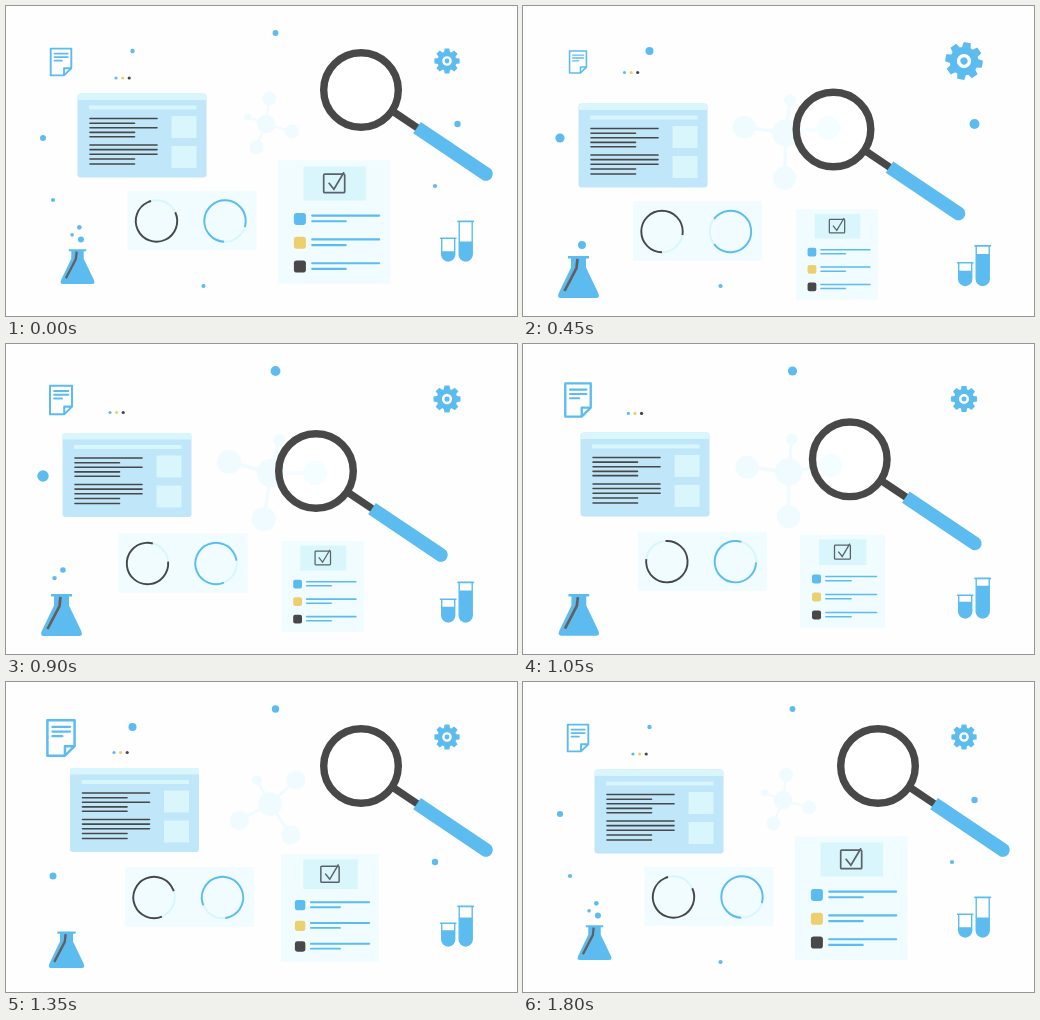
Recreate the animation shown at these times as an HTML page. Size 511 px wide and 310 px high, loop 1830 ms.

```html
<!DOCTYPE html>
<html lang="en">
<head>
<meta charset="utf-8">
<title>Research</title>
<style>
html, body { margin: 0; width: 100%; height: 100%; overflow: hidden; background: #fefefe; }
svg { display: block; width: 511px; height: 310px; }
</style>
</head>
<body>
<svg id="stage" viewBox="0 0 511 310" fill="none"></svg>
<script>
const BLUE = '#5dbcef', DARK = '#484848', YELLOW = '#ecd06f', PALE = '#f0fcff', ICE = '#d9f6fd';
const LOOP = 1830, STEP = 30, CYCLE = 1800;
const KEYS = [0, 210, 450, 900, 1170, 1350, 1800];
const stage = document.getElementById('stage');

function add(tag, attrs, parent = stage) {
  const node = document.createElementNS('http://www.w3.org/2000/svg', tag);
  set(node, attrs);
  return parent.appendChild(node);
}
function set(node, attrs) {
  for (const name in attrs) node.setAttribute(name, attrs[name]);
}
const group = parent => add('g', {}, parent);
const rect = (parent, x, y, width, height, fill, rx = 0) => add('rect', { x, y, width, height, fill, rx }, parent);
const path = (parent, d, attrs) => add('path', { d, ...attrs }, parent);
const disc = (parent, cx, cy, r, fill) => add('circle', { cx, cy, r, fill }, parent);
const line = (parent, x1, x2, y, stroke, width) =>
  path(parent, `M${x1} ${y}H${x2}`, { stroke, 'stroke-width': width, 'stroke-linecap': 'round' });
const place = (node, x, y, scale = 1, turn = 0) =>
  set(node, { transform: `translate(${x} ${y}) rotate(${turn}) scale(${scale})` });

// Periodic monotone cubic through the given values.
function track(values, times = KEYS) {
  const n = times.length - 1;
  const slope = i => (values[i + 1] - values[i]) / (times[i + 1] - times[i]);
  const tangent = i => {
    const a = slope((i + n - 1) % n), b = slope(i % n);
    return a * b > 0 ? 2 * a * b / (a + b) : 0;
  };
  return t => {
    let i = 0;
    while (i < n - 1 && t >= times[i + 1]) i++;
    const h = times[i + 1] - times[i], u = (t - times[i]) / h, v = 1 - u;
    return values[i] * (1 + 2 * u) * v * v + tangent(i) * h * u * v * v
      + values[i + 1] * (3 - 2 * u) * u * u - tangent(i + 1) * h * u * u * v;
  };
}

// Progress and opacity of something shown from start to end, across the seam if needed.
function span(t, start, end, fade = 90) {
  const wrap = ms => (ms + CYCLE) % CYCLE;
  const length = wrap(end - start), age = wrap(t - start);
  const opacity = Math.max(0, Math.min(1, age / fade, (length - age) / fade));
  return { p: age / length, opacity };
}

const updates = [];

function buildMolecule() {
  const g = group(), nodes = [[284, 34, 6], [0, 44, 12], [99, 46.5, 12], [195, 43.5, 12]];
  for (const [deg, dist, r] of nodes) {
    const a = deg * Math.PI / 180, x = dist * Math.cos(a), y = dist * Math.sin(a);
    path(g, `M0 0L${x} ${y}`, { stroke: '#effbfe', 'stroke-width': 3.5 });
    disc(g, x, y, r, '#effbfe');
  }
  const hub = disc(g, 0, 0, 13.5, '#effbfe');
  const x = track([260, 260, 263, 265, 266, 264, 260]), y = track([118, 123, 127, 129, 126, 122, 118]);
  const scale = track([.58, .79, .97, 1, .91, .8, .58]), turn = track([-83, -46, -7, 0, -21, -43, -83]);
  updates.push(t => {
    place(g, x(t), y(t), scale(t), turn(t));
    set(hub, { r: 11.5 + 2.6 / scale(t) });
  });
}

function buildWindow() {
  const g = group();
  rect(g, 71.5, 87.5, 129, 84, '#bfe6f9', 3);
  path(g, 'M71.5 94V90.5a3 3 0 0 1 3-3h123a3 3 0 0 1 3 3V94Z', { fill: ICE });
  rect(g, 83, 99.5, 107.5, 4, ICE);
  const rows = [[112.5, 1], [117.2, 0], [121.8, 1], [126.4, 0], [130.7, 0],
    [139, 1], [143.6, 1], [148.3, 1], [153, 0], [158, 0]];
  for (const [y, long] of rows) line(g, 84, long ? 151 : 128.5, y, DARK, 1.6);
  rect(g, 165.5, 110, 25, 22, ICE);
  rect(g, 165.5, 140, 25, 22, ICE);
  const x = track([0, -6.5, -16, -15, -12.5, -7.5, 0]), y = track([0, 6, 10, 1.5, .5, -1.5, 0]);
  updates.push(t => place(g, x(t), y(t)));

  const dots = group();
  [BLUE, YELLOW, DARK].forEach((color, i) => disc(dots, 110 + 6.6 * i, 72, 1.6, color));
  const dx = track([0, -5, -8.5, -6, -3.5, -2, 0]), dy = track([0, -3, -5.5, -3.5, -2, -1.5, 0]);
  updates.push(t => place(dots, dx(t), dy(t)));
}

function buildRings() {
  const g = group();
  rect(g, 121.5, 185, 129, 59, PALE);
  function ring(cx, color, turn, gap) {
    const shape = { cx, cy: 215, r: 20.7, 'stroke-width': 1.9 };
    add('circle', { ...shape, stroke: ICE }, g);
    const arc = add('circle', { ...shape, stroke: color, pathLength: 360 }, g);
    updates.push(t => set(arc, {
      'stroke-dasharray': `${360 - gap(t)} ${gap(t)}`,
      transform: `rotate(${turn(t) + gap(t) / 2} ${cx} 215)`
    }));
  }
  ring(150.5, DARK, track([-65, -140, -310, -400, -585, -695, -785]), track([80, 20, 80, 70, 85, 85, 80]));
  ring(219, BLUE, track([55, -45, -180, -330, -460, -600, -665]), () => 75);
  const x = track([0, -7, -11.5, -9, -4.5, -2.5, 0]), y = track([0, 3, 10.5, 4.5, 1.5, .5, 0]);
  updates.push(t => place(g, x(t), y(t)));
}

function buildChecklist() {
  const g = group(), ink = { stroke: '#5a6266', 'stroke-width': 1.7 };
  rect(g, -56.2, -61.8, 112.5, 123.5, PALE);
  rect(g, -30.7, -55.7, 62.5, 34, ICE);
  add('rect', { x: -10.5, y: -48, width: 21, height: 18.5, rx: 1, ...ink }, g);
  path(g, 'M-5.5 -39.5L-.3 -33L9.8 -50', ink);
  [BLUE, YELLOW, DARK].forEach((color, i) => {
    const y = -9.3 + 23.8 * i;
    rect(g, -40.3, y, 12, 12, color, 2.8);
    line(g, -22, 45, y + 2.7, BLUE, 2.1);
    line(g, -22, 11.5, y + 8.4, BLUE, 2.1);
  });
  const x = track([328.2, 321.8, 314, 316.8, 321.8, 324, 328.2]);
  const y = track([216.2, 231.2, 248.5, 242.5, 232.5, 226, 216.2]);
  const scale = track([1, .813, .73, .735, .787, .871, 1]);
  updates.push(t => place(g, x(t), y(t), scale(t)));
}

function buildMagnifier() {
  const g = group(), arm = add('g', { transform: 'rotate(33.9)' }, g);
  rect(arm, 38, -3.7, 32, 7.4, DARK);
  path(arm, 'M67.5 -6.8H150.6a6.8 6.8 0 0 1 0 13.6H67.5Z', { fill: BLUE });
  add('circle', { r: 37.3, stroke: DARK, 'stroke-width': 7.4, fill: '#fefefe', 'fill-opacity': .3 }, g);
  const times = [0, 210, 450, 540, 900, 1170, 1350, 1800];
  const x = track([355, 324, 310.5, 310, 310, 344, 355, 355], times);
  const y = track([84, 97, 123.5, 127, 127, 101, 84, 84], times);
  updates.push(t => place(g, x(t), y(t)));
}

function buildDocument() {
  const g = group(), ink = { stroke: BLUE, 'stroke-width': 1.9, 'stroke-linejoin': 'round' };
  path(g, 'M-10.3 -13.4H10.3V6.2L3 13.4H-10.3ZM3 13.4V6.2H10.3', ink);
  [[-8.4, 6.8], [-4.9, 6.8], [-1.4, 1]].forEach(([y, end]) => line(g, -6.5, end, y, BLUE, 1.7));
  const scale = track([1, .9, .82, 1.07, 1.32, 1.32, 1]);
  updates.push(t => place(g, 55, 56, scale(t)));
}

function buildGear() {
  const g = group();
  for (let i = 0; i < 8; i++)
    path(g, 'M-3.1 -8L-2.4 -12.6H2.4L3.1 -8Z', { fill: BLUE, transform: `rotate(${45 * i})` });
  disc(g, 0, 0, 9.6, BLUE);
  add('circle', { r: 3.6, stroke: '#fefefe', 'stroke-width': 2.4 }, g);
  const scale = track([1, 1.13, 1.48, 1.07, 1.02, 1, 1]), turn = track([0, 15, 55, 90, 90, 90, 90]);
  updates.push(t => place(g, 441, 55, scale(t), turn(t)));
}

function buildFlask() {
  const g = group();
  path(g, 'M-10.5 -42H10.5V-39.5H7.5V-30.5L19.5 -5.5Q22 0 17.5 0H-17.5Q-22 0 -19.5 -5.5L-7.5 -30.5V-39.5H-10.5Z',
    { fill: BLUE });
  path(g, 'M-1 -39L-2 -30L-14 -7', { stroke: '#665e5c', 'stroke-width': 2.7 });
  const x = track([71.5, 58, 55.5, 55.5, 56.5, 60.5, 71.5]);
  const y = track([278, 287, 292, 292, 291, 286, 278]);
  const scale = track([.83, .85, 1, 1, .97, .87, .83]);
  updates.push(t => place(g, x(t), y(t), scale(t)));

  const bubble = (from, to, start, end) => {
    const node = disc(stage, 0, 0, 0, BLUE);
    updates.push(t => {
      const { p, opacity } = span(t, start, end);
      const [cx, cy, r] = from.map((v, i) => v + (to[i] - v) * p);
      set(node, { cx, cy, r, opacity });
    });
  };
  bubble([68, 246, 2.3], [76, 209, 2.3], 1500, 150);
  bubble([65, 247, 1.8], [66.6, 219.8, 1.8], 1500, 150);
  bubble([68, 248, 3], [78.4, 226.4, 3], 1500, 150);
  bubble([59.4, 241.6, 4.2], [56.3, 221.6, 2.4], 360, 1050);
  bubble([52, 248, 2.2], [47, 228, 2.2], 560, 1050);
}

function buildTubes() {
  const g = group();
  function tube(x, top, level) {
    const cup = y => `M${x} ${y}V248.5a6.5 6.5 0 0 0 13 0V${y}`;
    path(g, cup(top), { stroke: BLUE, 'stroke-width': 1.4 });
    line(g, x - 1.2, x + 14.2, top, BLUE, 1.6);
    const liquid = path(g, '', { fill: BLUE });
    updates.push(t => set(liquid, { d: cup(top + level(t)) + 'Z' }));
  }
  tube(435.7, 232.2, track([13, 11, 8, 7.5, 6, 7, 13]));
  tube(453.2, 215.4, track([20, 13, 8, 8, 7, 11, 20]));
  const y = track([0, 12.5, 24.5, 23, 14.5, 9, 0]);
  updates.push(t => place(g, 0, y(t)));
}

function buildDots() {
  const dot = (cx, cy, start, end, radii) => {
    const node = disc(stage, cx, cy, 0, BLUE), r = track(radii);
    updates.push(t => set(node, { r: r(t), opacity: span(t, start, end).opacity }));
  };
  dot(126.5, 45, 1200, 700, [2.2, 3, 4, 4.5, 4, 4, 2.2]);
  dot(269.5, 27, 560, 390, [2.9, 3, 6, 4.9, 4.3, 3.7, 2.9]);
  dot(37, 132, 1560, 1000, [3, 3.7, 4.6, 5.7, 7, 6.5, 3]);
  dot(451.5, 118, 1560, 700, [3.2, 4, 5, 6, 5, 4, 3.2]);
  dot(47, 194, 1125, 360, [2.1, 3.9, 5, 3, 3, 3.5, 2.1]);
  dot(429, 180, 1050, 120, [2.1, 2.5, 2.5, 3, 3.7, 3.2, 2.1]);
  dot(197.5, 280, 1560, 700, [2.1, 3.1, 2.1, 2, 2, 2, 2.1]);
}

[buildMolecule, buildWindow, buildRings, buildChecklist, buildMagnifier,
  buildDocument, buildGear, buildFlask, buildTubes, buildDots].forEach(build => build());

function render(ms) {
  const t = Math.floor(ms % LOOP / STEP) * STEP % CYCLE;
  for (const update of updates) update(t);
}

let origin;
function tick(now) {
  origin ??= now;
  render(now - origin);
  requestAnimationFrame(tick);
}
render(0);
requestAnimationFrame(tick);
</script>
</body>
</html>
```
